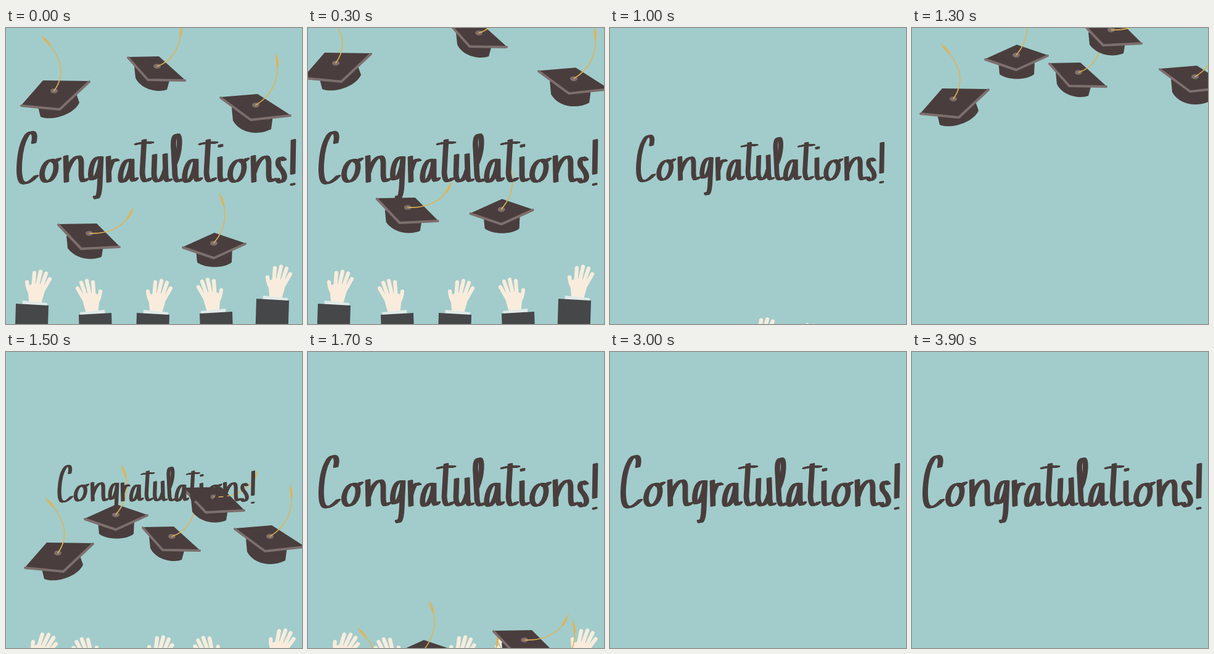
An HTML page with a canvas for the animation above (4000 ms loop, 480 px wide and 480 px high).

```html
<!DOCTYPE html>
<html lang="en">
<head>
<meta charset="utf-8">
<title>Congratulations!</title>
<style>
html, body { margin: 0; width: 100%; height: 100%; overflow: hidden; background: #a1cccb; }
canvas { display: block; width: 100vw; height: 100vh; }
</style>
</head>
<body>
<canvas id="stage" width="480" height="480" role="img" aria-label="Congratulations!"></canvas>
<script>
const ctx = document.getElementById('stage').getContext('2d');
const BG = '#a1cccb', DARK = '#493e3d', EDGE = '#7d6f6d', GOLD = '#e0b355';
const SKIN = '#f9ecdd', CUFF = '#e2eae8', SUIT = '#464748';

// Caps, relative to the button. rise: x, y, vx, vy; fall: x, y, vx, vy at 1.3 s.
const caps = [
  { rise: [78, 102, -110, -20], fall: [67, 115, 85, 1055],
    board: [-53, 23, -18, -17, 57, -16, 9, 29],
    body: 'M-27 22L-22 42C-6 49 31 40 41 19L35 2Z', tassel: [29, -41, -20, -89] },
  { rise: [245, 62, 107, -50], fall: [270, 72, -5, 1135],
    board: [-47, -15, 3, -16, 45, 22, -15, 21],
    body: 'M-37 0L-35 19C-25 39 2 43 16 38L21 20Z', tassel: [38, -12, 40, -68] },
  { rise: [405, 125, 87, -13], fall: [459, 79, -155, 1100],
    board: [-57, -13, 3, -18, 56, 16, -8, 23],
    body: 'M-39 4L-37 25C-26 46 5 50 25 39L28 16Z', tassel: [44, -27, 33, -83] },
  { rise: [135, 333, 89, -10], fall: [323, 3, 70, 1160],
    board: [-50, -15, 12, -16, 49, 21, -13, 24],
    body: 'M-37 4L-35 24C-22 42 4 45 20 38L23 20Z', tassel: [54, 2, 71, -41] },
  { rise: [337, 349, -78, -53], fall: [169, 44, 45, 1100],
    board: [-50, 6, 1, -17, 51, 0, 0, 23],
    body: 'M-29 10L-27 31C-14 41 17 41 29 31L30 8Z', tassel: [31, -38, 9, -80] }
];
for (const c of caps) c.body = new Path2D(c.body);

// Hands: wrist x, y, mirror, tilt in degrees, drop
const hands = [
  [48, 444, 1, 13, 9], [139, 459, -1, -8, 3], [244, 459, 1, 3, 1],
  [335, 457, -1, -7, 3], [438, 436, 1, 7, 12]
];
const fingers = new Path2D('M-4 -20L-2 -47M2 -22L8 -49M8 -20L17 -46M11 -16L23 -37M-7 -12Q-13 -20 -14 -32');
const palm = new Path2D('M-11 -26C-6 -31 10 -31 14 -24C16 -15 11 -6 9 4L-11 4C-10 -5 -14 -15 -11 -26Z');

// Lettering, written with a flat nib
const o = x => `M${x + 6} 214C${x - 9} 213 ${x - 17} 246 ${x - 4} 249C${x + 10} 250 ${x + 18} 220 ${x + 7} 214Q${x + 8} 221 ${x + 17} 212`;
const n = x => `M${x} 208L${x + 1} 249M${x + 1} 236C${x + 8} 211 ${x + 24} 199 ${x + 25} 218L${x + 25} 238Q${x + 26} 254 ${x + 34} 245`;
const a = x => `M${x + 10} 216C${x} 205 ${x - 11} 239 ${x - 6} 248C${x} 254 ${x + 9} 237 ${x + 11} 214L${x + 11} 239Q${x + 12} 253 ${x + 18} 244`;
const t = x => `M${x} 182L${x - 3} 234Q${x - 2} 256 ${x + 10} 244M${x - 12} 188Q${x - 2} 185 ${x + 12} 186`;
const word = new Path2D([
  'M45 186C50 165 38 165 32 177C21 196 18 242 26 250Q34 256 49 240',
  o(69), n(97),
  'M154 211C141 203 134 237 139 245C146 248 153 228 154 210L152 256C151 273 147 280 145 273',
  'M166 209L167 249M167 232Q173 208 180 215',
  a(193), t(224),
  'M241 206L240 235C240 255 253 252 258 230M258 205L259 239Q260 252 266 246',
  'M274 220C282 202 284 173 277 173C271 174 271 187 272 198L274 239Q276 254 286 245',
  a(297), t(328),
  'M347 210L347 239Q348 253 356 245M348 190L348 192',
  o(374), n(401),
  'M451 214C444 204 438 217 443 225C451 234 455 243 448 249Q442 252 440 245',
  'M466 182L465 236M465 253L465 254'
].join(''));

function drawWord(scale, angle) {
  if (scale <= 0) return;
  ctx.save();
  ctx.translate(244, 222);
  ctx.rotate(angle);
  ctx.scale(scale, scale);
  ctx.translate(-244, -222);
  ctx.strokeStyle = DARK;
  ctx.lineWidth = 2.8;
  for (let dx = -3; dx <= 3; dx++) {
    ctx.save();
    ctx.translate(dx, -dx * 0.2);
    ctx.stroke(word);
    ctx.restore();
  }
  ctx.restore();
}

function drawCap(cap, x, y) {
  const [lx, ly, tx, ty, rx, ry, bx, by] = cap.board;
  const [cx, cy, ex, ey] = cap.tassel;
  ctx.save();
  ctx.translate(x, y);
  ctx.fillStyle = DARK;
  ctx.fill(cap.body);
  fillPoly(DARK, ...cap.board);
  ctx.beginPath();
  ctx.moveTo(lx, ly + 1);
  ctx.lineTo(bx, by + 1);
  ctx.lineTo(rx, ry + 1);
  ctx.strokeStyle = EDGE;
  ctx.lineWidth = 4;
  ctx.stroke();
  ctx.beginPath();
  ctx.ellipse(0, 0, 6, 4, 0, 0, 7);
  ctx.fillStyle = EDGE;
  ctx.fill();
  ctx.beginPath();
  ctx.moveTo(ex, ey);
  ctx.quadraticCurveTo(cx, cy, 0, 0);
  ctx.strokeStyle = GOLD;
  ctx.lineWidth = 1.6;
  ctx.stroke();
  ctx.setLineDash([12, 999]);
  ctx.lineDashOffset = -6;
  ctx.lineWidth = 3.6;
  ctx.stroke();
  ctx.restore();
}

function fillPoly(color, ...p) {
  ctx.beginPath();
  for (let i = 0; i < p.length; i += 2) ctx.lineTo(p[i], p[i + 1]);
  ctx.fillStyle = color;
  ctx.fill();
}

function drawHand([x, y, side, tilt, drop], turn, fall, extra) {
  ctx.save();
  ctx.translate(x, y + drop * fall + extra + 10);
  ctx.rotate(tilt * turn * Math.PI / 180);
  ctx.translate(0, -10);
  ctx.scale(side, 1);
  ctx.fillStyle = ctx.strokeStyle = SKIN;
  ctx.lineWidth = 6.2;
  ctx.stroke(fingers);
  ctx.fill(palm);
  fillPoly(CUFF, -21, -2, 19, 2, 18, 10, -22, 8);
  fillPoly(SUIT, -32, 3, 21, 6, 18, 100, -35, 100);
  ctx.restore();
}

function wordScale(s) {
  if (s < 0.9) return 1;
  if (s < 1.3) return Math.max(0, 1 - ((s - 0.9) / 0.3) ** 2);
  return s < 1.7 ? Math.sin((s - 1.3) / 0.4 * Math.PI / 2) : 1;
}

function wobble(s) {
  if (s < 1.7 || s > 2.3) return 0;
  return -0.1 * Math.sin((s - 1.7) / 0.2 * Math.PI) * (2.5 - s) / 0.6;
}

function draw(s) {
  ctx.fillStyle = BG;
  ctx.fillRect(0, 0, 480, 480);
  ctx.lineCap = ctx.lineJoin = 'round';

  if (s < 1.25) {
    const u = Math.max(0, s - 0.3) / 0.4;
    for (const h of hands) drawHand(h, Math.min(1, u * u), u ** 3, 6 * u ** 4);
  } else if (s < 1.8) {
    for (const h of hands) drawHand(h, 1, 1, 26 + 2500 * (s - 1.6) ** 2);
  }

  if (s < 1.8) for (const c of caps) {
    const up = s < 1.05, d = up ? s : s - 1.3;
    const [x, y, vx, vy] = up ? c.rise : c.fall;
    drawCap(c, x + vx * d, y + vy * d - (up ? 433 * d * d : 0));
  }
  drawWord(wordScale(s), wobble(s));
}

// The motion runs at ten steps a second.
const start = performance.now();
function tick() {
  draw(Math.floor((performance.now() - start) % 4000 / 100) / 10);
  requestAnimationFrame(tick);
}
tick();
</script>
</body>
</html>
```
